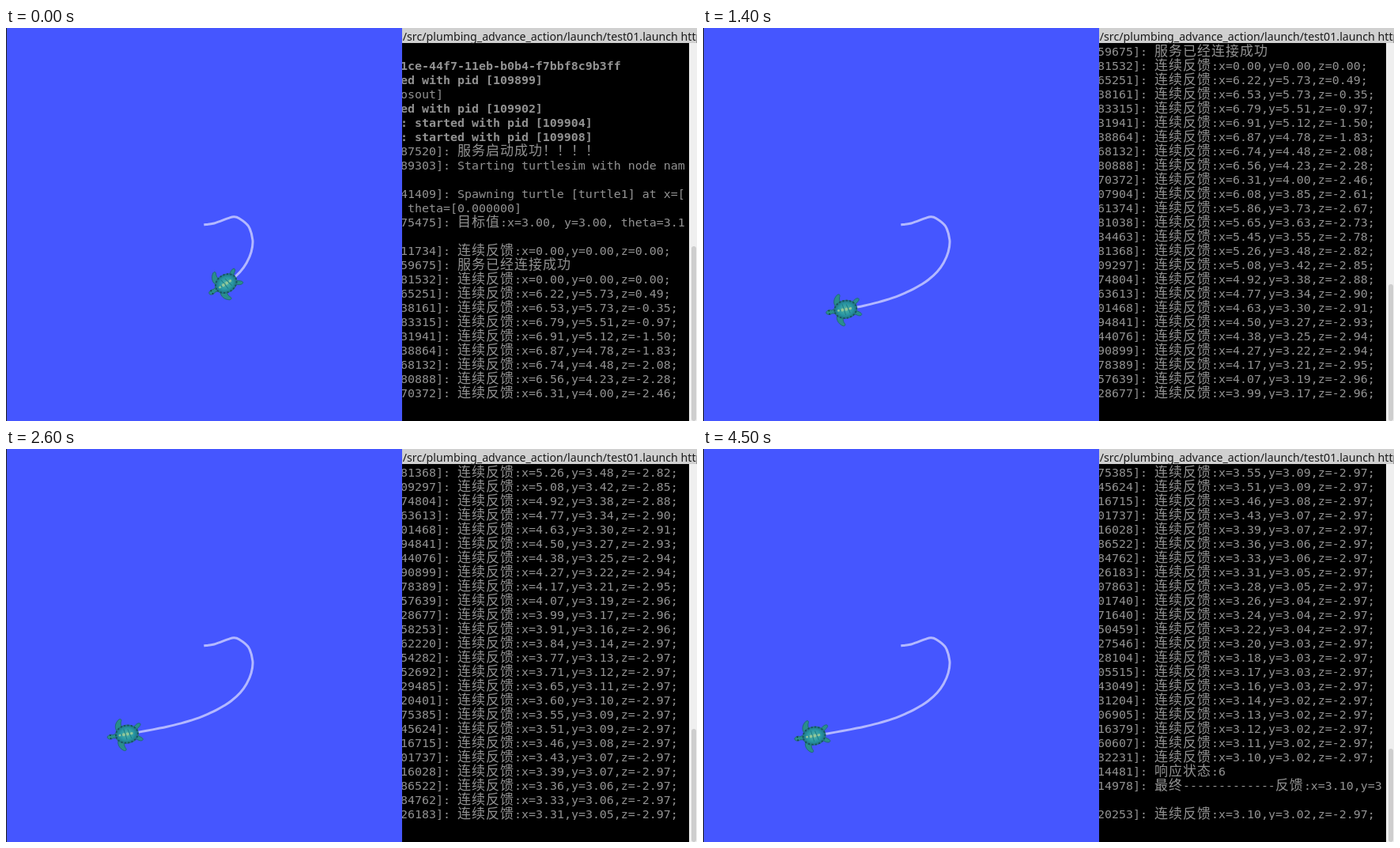
An HTML page for the animation above (4.7 s loop, 874x497 px).

```html
<!DOCTYPE html>
<html lang="zh-CN">
<head>
<meta charset="utf-8">
<title>Turtle action feedback</title>
<style>
  html, body { margin: 0; width: 100%; height: 100%; overflow: hidden; background: #000; }
  svg { display: block; }
  text { white-space: pre; }
  #log { font: 14.95px "DejaVu Sans Mono", monospace; fill: #929292; }
  #log .bold { font-weight: bold; }
  #log tspan { font: 17px "Noto Sans CJK SC", "Noto Sans CJK", sans-serif; letter-spacing: 1px; }
  #title { font: 14.2px "Noto Sans", sans-serif; fill: #1a1a1a; }
</style>
</head>
<body>
<svg width="874" height="497" viewBox="0 0 874 497">
  <defs>
    <clipPath id="screen"><rect x="501" y="20" width="363" height="449"/></clipPath>
    <radialGradient id="shell">
      <stop offset="0" stop-color="#55b5a5"/>
      <stop offset=".6" stop-color="#2896a3"/>
      <stop offset="1" stop-color="#1d6f80"/>
    </radialGradient>
  </defs>

  <rect width="874" height="497"/>
  <rect x="501" width="373" height="19" fill="#d0d0d0"/>
  <text id="title" x="495" y="16">s/src/plumbing_advance_action/launch/test01.launch http</text>
  <g clip-path="url(#screen)"><g id="log"></g></g>
  <rect x="864" y="19" width="10" height="478" fill="#efefef"/>
  <rect id="thumb" x="867" width="6" rx="3" fill="#cecece"/>

  <rect width="1" height="497" fill="#222"/>
  <rect x="1" width="500" height="497" fill="#4556ff"/>
  <path id="trail" fill="none" stroke="#b3b8ff" stroke-width="3"/>

  <g id="turtle">
    <g fill="#2a8d8c" stroke="#1f686f" stroke-width=".8">
      <path id="fin" d="M11 6C13 10 12 16 6 20C3 21 2 19 4 16C5 13 4 11 4 8Z"/>
      <use href="#fin" transform="scale(1 -1)"/>
      <path id="foot" d="M-10 7C-13 9 -16 12 -19 11C-21 10 -20 8 -17 6L-13 3Z"/>
      <use href="#foot" transform="scale(1 -1)"/>
      <path d="M12 -3L17 -2C19 -4 24 -2.5 24 0C24 2.5 19 4 17 2L12 3Z"/>
    </g>
    <ellipse cx="-1" rx="15" ry="12" fill="url(#shell)"/>
    <ellipse cx="-1" rx="14" ry="11" fill="none" stroke="#1a4f58" stroke-width="1.8" stroke-dasharray="2 2.4"/>
    <path d="M-9 0H7M-6 -6L-3 6M0 -7L2 7" stroke="#1f7c86" fill="none"/>
    <g fill="#8fc79a">
      <ellipse cx="-7" rx="2" ry="1.6"/><ellipse cx="-2" rx="2" ry="2"/>
      <ellipse cx="3" rx="2" ry="2"/><ellipse cx="8" rx="1.6" ry="1.4"/>
    </g>
    <circle cx="20" cy="-2" r=".9" fill="#12363c"/><circle cx="20" cy="2" r=".9" fill="#12363c"/>
  </g>
</svg>

<script>
const $ = id => document.getElementById(id);
const LOOP = 4700, ROW = 18, GOAL = 3, MESSAGES = 50;

// Opening turn: x, y, heading at each message
const turn = [
  [6.22, 5.73, 0.49], [6.53, 5.73, -0.35], [6.79, 5.51, -0.97], [6.91, 5.12, -1.5],
  [6.87, 4.78, -1.83], [6.74, 4.48, -2.08], [6.56, 4.23, -2.28], [6.31, 4, -2.46]
];

// Approach: y and heading follow from dx, the horizontal distance to the goal
const approach = dx => [
  GOAL + dx,
  GOAL + 0.17 * dx + 0.0036 * dx ** 4,
  Math.atan(0.17 + 0.0144 * dx ** 3) - Math.PI
];

// Each message covers a fixed share of the remaining distance
const poses = [...turn];
for (let dx = 3.31; poses.length < MESSAGES;) {
  const [x, y, heading] = approach(dx);
  dx += 0.0804 * Math.hypot(x - GOAL, y - GOAL) * Math.cos(heading);
  poses.push(approach(dx));
}

let seed = 11;
function stamp() {
  seed = (seed * 1103515245 + 12345) % 2147483648;
  return String(Math.floor(seed / 2147483648 * 1e5)).padStart(5, '0');
}

function feedback(id, pose) {
  const [x, y, z] = pose.map(v => v.toFixed(2));
  return `${id}]: 连续反馈:x=${x},y=${y},z=${z};`;
}

// A leading * marks bold
const lines = [
  '',
  '*1ce-44f7-11eb-b0b4-f7bbf8c9b3ff',
  '*ed with pid [109899]',
  'osout]',
  '*ed with pid [109902]',
  '*: started with pid [109904]',
  '*: started with pid [109908]',
  '87520]: 服务启动成功！！！！',
  '89303]: Starting turtlesim with node nam',
  '',
  '41409]: Spawning turtle [turtle1] at x=[',
  ' theta=[0.000000]',
  '75475]: 目标值:x=3.00, y=3.00, theta=3.1',
  '',
  feedback('11734', [0, 0, 0]),
  '59675]: 服务已经连接成功',
  feedback('81532', [0, 0, 0]),
  ...poses.map(pose => feedback(stamp(), pose)),
  '14481]: 响应状态:6',
  '14978]: 最终-------------反馈:x=3.10,y=3',
  '',
  feedback('20253', poses[MESSAGES - 1])
];

$('log').innerHTML = lines.map((line, i) => {
  const bold = line[0] === '*';
  const body = line.slice(bold ? 1 : 0).replace(/[\u4e00-\u9fff！]+/g, '<tspan>$&</tspan>');
  return `<text x="499" y="${35 + ROW * i}"${bold ? ' class="bold"' : ''}>${body}</text>`;
}).join('');

// World units to stage pixels
const place = ([x, y]) => ({ x: 1 + 45 * x, y: 498.5 - 45 * y });
const opening = [[5.54, 5.55], [5.83, 5.59], turn[0], [6.38, 5.77], ...turn.slice(1)].map(place);

function smoothPath(points) {
  const at = i => points[Math.max(0, Math.min(points.length - 1, i))];
  let d = `M${points[0].x} ${points[0].y}`;
  for (let i = 0; i < points.length - 1; i++) {
    const [a, b, c, e] = [at(i - 1), at(i), at(i + 1), at(i + 2)];
    d += `C${b.x + (c.x - a.x) / 6} ${b.y + (c.y - a.y) / 6} ` +
         `${c.x - (e.x - b.x) / 6} ${c.y - (e.y - b.y) / 6} ${c.x} ${c.y}`;
  }
  return d;
}

function render(ms) {
  let step = Math.floor(ms / 100);
  if (step > 40) step = step < 43 ? 40 : step < 45 ? 43 : 45;

  const scrolled = step < 40 ? step + Math.floor((step + 5) / 10) : 46;
  $('log').setAttribute('transform', `translate(0 ${-ROW * scrolled})`);
  const top = Math.round(505 - 12928 / (56.5 + scrolled));
  $('thumb').setAttribute('y', top);
  $('thumb').setAttribute('height', 497 - top);

  const dx = 0.01 + 3.134 * Math.exp(-0.085 * step);
  const pose = approach(dx), { x, y } = place(pose);
  const track = [...opening];
  for (let d = 3.1; d > dx; d -= 0.2) track.push(place(approach(d)));
  $('trail').setAttribute('d', smoothPath([...track, { x, y }]));
  $('turtle').setAttribute('transform',
    `translate(${x} ${y}) rotate(${-pose[2] * 180 / Math.PI})`);
}

const start = performance.now();
function tick(now) {
  render(Math.max(0, now - start) % LOOP);
  requestAnimationFrame(tick);
}
render(0);
requestAnimationFrame(tick);
</script>
</body>
</html>
```
